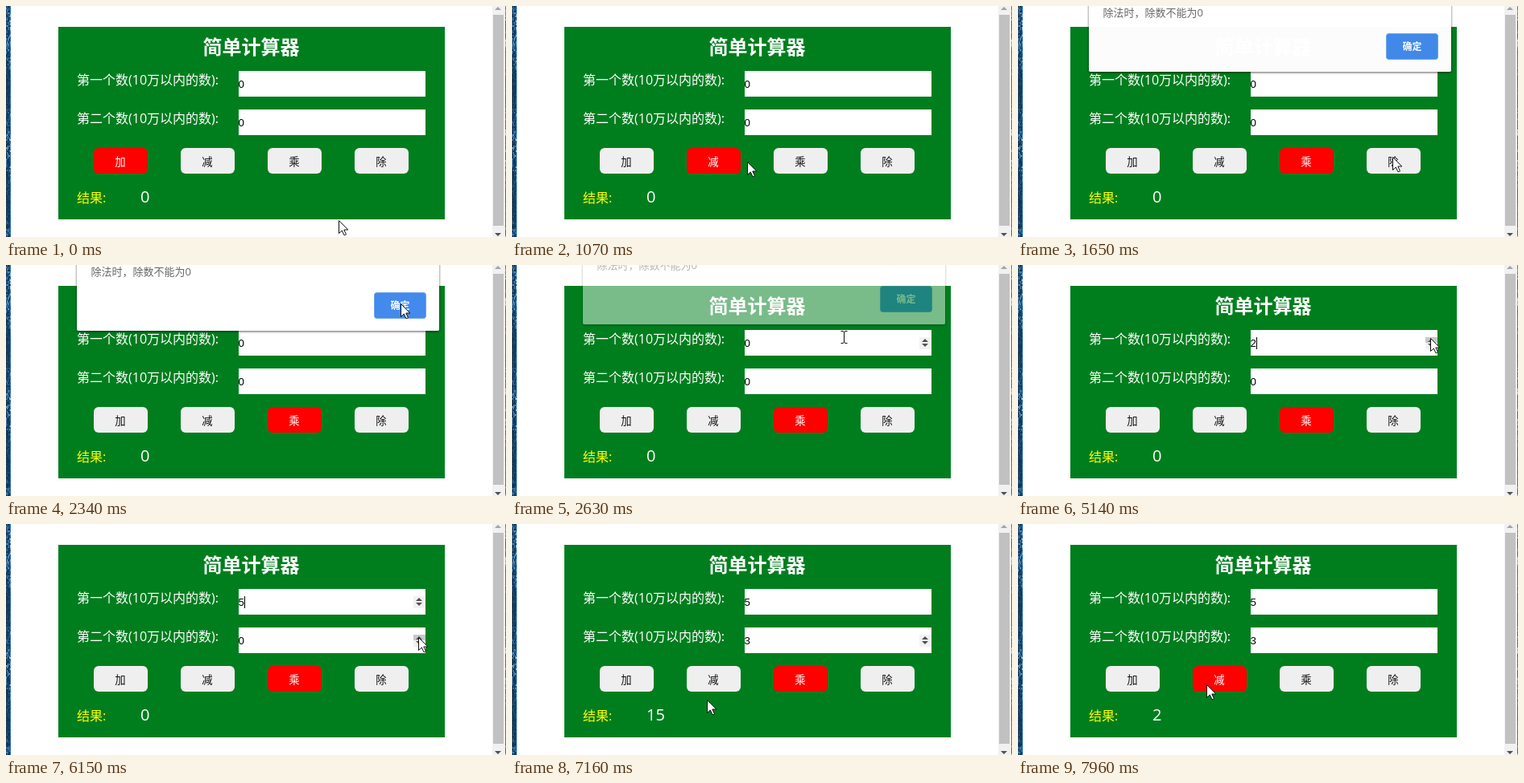
An HTML page that plays this animation: 621 by 288 pixels, repeating every 8 s.

```html
<!DOCTYPE html>
<html lang="zh-CN">
<head>
<meta charset="utf-8">
<title>简单计算器</title>
<style>
html, body { margin: 0; width: 100%; height: 100%; overflow: hidden; background: #fff; }
svg { display: block; width: 100%; height: 100%; }
text { font-family: "Open Sans", "Noto Sans CJK SC", "Noto Sans CJK", sans-serif; font-size: 16px; font-weight: 500; fill: #fff; }
.field { font: 13.333px "Liberation Sans", Arial, sans-serif; fill: #000; }
.mid { text-anchor: middle; }
.btn { font-size: 13.333px; font-weight: 400; }
</style>
</head>
<body>
<svg viewBox="0 0 621 288" xmlns="http://www.w3.org/2000/svg">
  <defs>
    <filter id="shade" x="-5%" y="-20%" width="110%" height="150%">
      <feDropShadow dx="0" dy="1" stdDeviation="1.5" flood-color="#000" flood-opacity=".65"/>
    </filter>
  </defs>
  <rect width="621" height="288" fill="#fff"/>
  <g id="sea"></g>

  <rect x="604" width="16" height="288" fill="#f1f1f1"/>
  <rect x="605" y="11" width="13" height="263" fill="#c1c1c1"/>
  <path d="M607 5h8l-4-4z" fill="#a3a3a3"/>
  <path d="M607 283h8l-4 4z" fill="#505050"/>

  <rect x="65" y="26" width="480" height="240" fill="#007e1e"/>
  <text class="mid" x="304.500" y="59.500" style="font-size:24px;font-weight:700">简单计算器</text>
  <text x="88" y="98">第一个数(10万以内的数):</text>
  <text x="88" y="146">第二个数(10万以内的数):</text>
  <text x="88" y="245" style="fill:#ff0">结果:</text>
  <text id="result" x="167" y="245" style="font-size:20px"></text>
  <g id="fields"></g>
  <g id="buttons"></g>

  <g id="dialog">
    <rect x="88" y="-20" width="450" height="102" rx="2" fill="#fff" filter="url(#shade)"/>
    <text x="105.500" y="12.500" style="font-size:13px;font-weight:400;fill:#666">除法时，除数不能为0</text>
    <rect x="457.500" y="34.500" width="64" height="32" rx="3" fill="#428aec" stroke="#6ea5f0"/>
    <text class="mid" x="489.500" y="55" style="font-size:12px;font-weight:700">确定</text>
  </g>

  <path id="arrow" d="M.5 .5V16.500L4.300 13L7 18.800L9.500 17.800L6.800 12H11.800Z" fill="#fff" stroke="#111"/>
  <path id="beam" d="M-3.500 -7.500H-1L.5 -6.500L2 -7.500H4.500M.5 -6.500V6.500M-3.500 7.500H-1L.5 6.500L2 7.500H4.500" fill="none" stroke="#111"/>
</svg>
<script>
const LOOP = 8000;
const $ = id => document.getElementById(id);

function add(parent, tag, attrs, text) {
  const el = document.createElementNS("http://www.w3.org/2000/svg", tag);
  for (const k in attrs) el.setAttribute(k, attrs[k]);
  if (text) el.textContent = text;
  parent.appendChild(el);
  return el;
}

const show = (el, on) => el.setAttribute("visibility", on ? "visible" : "hidden");
const move = (el, x, y) => el.setAttribute("transform", `translate(${x} ${y})`);
const clamp = (v, lo, hi) => Math.min(hi, Math.max(lo, v));
const part = (t, from, to) => clamp((t - from) / (to - from), 0, 1);
const smooth = k => k * k * (3 - 2 * k);

// Pointer trips: start, end, x, y
const home = [413, 267];
const trips = [
  [70, 700, 250, 193], [1000, 1160, 352, 195], [1240, 1400, 465, 188],
  [1780, 2200, 490, 48], [2340, 2630, 412, 90], [2940, 3480, 506, 92],
  [3600, 4040, 525, 100], [4440, 4700, 512, 91], [5720, 5980, 512, 141],
  [6700, 7160, 242, 219], [7480, 7550, 246, 200], [7790, 7960, 234, 200]
];

function pointerAt(t) {
  let [x, y] = home;
  for (const [from, to, tx, ty] of trips) {
    const k = smooth(part(t, from, to));
    x += (tx - x) * k;
    y += (ty - y) * k;
  }
  return [Math.round(x), Math.round(y)];
}

// Steady clicks on each field's "up" arrow
const clicks = [
  { start: 4890, gap: 200, max: 5 },
  { start: 6380, gap: 140, max: 3 }
];
const valueAt = (c, t) => clamp(Math.floor((t - c.start) / c.gap) + 1, 0, c.max);

function caretOn(i, n, t) {
  const last = n ? clicks[i].start + (n - 1) * clicks[i].gap : 2980;
  return Math.floor((t - last) / 500) % 2 === 0;
}

// Sea wallpaper beside the window
let seed = 7;
const rnd = () => (seed = seed * 16807 % 2147483647) / 2147483647;
for (const x of [0, 1, 2, 3, 4, 5, 620])
  for (let y = 0; y < 288; y += 2) {
    const foam = rnd() ** 3 * (.6 + .4 * Math.sin(y / 22));
    add($("sea"), "rect", {
      x, y, width: 1, height: 2,
      fill: `hsl(208 ${60 - 25 * foam}% ${20 + 50 * foam + (x > 4 ? 20 : 0)}%)`
    });
  }

const fields = [81, 129].map(y => {
  const g = add($("fields"), "g", { transform: `translate(289 ${y})` });
  add(g, "rect", { width: 232, height: 32, fill: "#fff" });
  const value = add(g, "text", { class: "field", x: -.5, y: 21 });
  const caret = add(g, "rect", { x: 7, y: 9, width: 1, height: 15, fill: "#000" });
  const spin = add(g, "g", {});
  add(spin, "rect", { x: 217, y: 9, width: 15, height: 15, fill: "#f2f2f2" });
  const up = add(spin, "rect", { x: 217, y: 9, width: 15, height: 7, fill: "#c8c8c8" });
  add(spin, "path", { d: "M220 15h8l-4-4zM220 17h8l-4 4z", fill: "#505050" });
  return { y, value, caret, spin, up };
});

const buttons = ["加", "减", "乘", "除"].map((label, i) => {
  const g = add($("buttons"), "g", { transform: `translate(${109 + 108 * i} 177)` });
  return {
    box: add(g, "rect", { width: 67, height: 32, rx: 6 }),
    text: add(g, "text", { class: "mid btn", x: 33, y: 22 }, label)
  };
});

function draw(t) {
  const [x, y] = pointerAt(t);
  const values = clicks.map(c => valueAt(c, t));
  const op = t < 700 ? 0 : t < 1200 || t >= 7720 ? 1 : 2;
  const focus = t < 2940 || t >= 7720 ? -1 : t < clicks[1].start ? 0 : 1;
  let beam = false;

  fields.forEach((f, i) => {
    const over = t > 2400 && x >= 289 && x < 521 && y >= f.y && y < f.y + 32;
    const onSpin = over && x > 507;
    if (over && !onSpin) beam = true;
    f.value.textContent = values[i];
    show(f.caret, focus === i && caretOn(i, values[i], t));
    show(f.spin, over || focus === i);
    show(f.up, onSpin && y < f.y + 16);
  });

  buttons.forEach((b, i) => {
    b.box.setAttribute("fill", i === op ? "#f00" : "#efefef");
    b.text.style.fill = i === op ? "#fff" : "#111";
  });

  $("result").textContent = op === 2 ? values[0] * values[1] : values[0] - values[1];

  const enter = 1 - (1 - part(t, 1540, 1690)) ** 3;
  const leave = smooth(part(t, 2460, 2790));
  $("dialog").setAttribute("opacity", enter * (1 - leave));
  move($("dialog"), 0, Math.round(-6 * (1 - enter) - 16 * leave));

  show($("arrow"), !beam);
  show($("beam"), beam);
  move($("arrow"), x, y);
  move($("beam"), x, y);
}

const start = performance.now();
function frame() {
  draw((performance.now() - start) % LOOP);
  requestAnimationFrame(frame);
}
frame();
</script>
</body>
</html>
```
